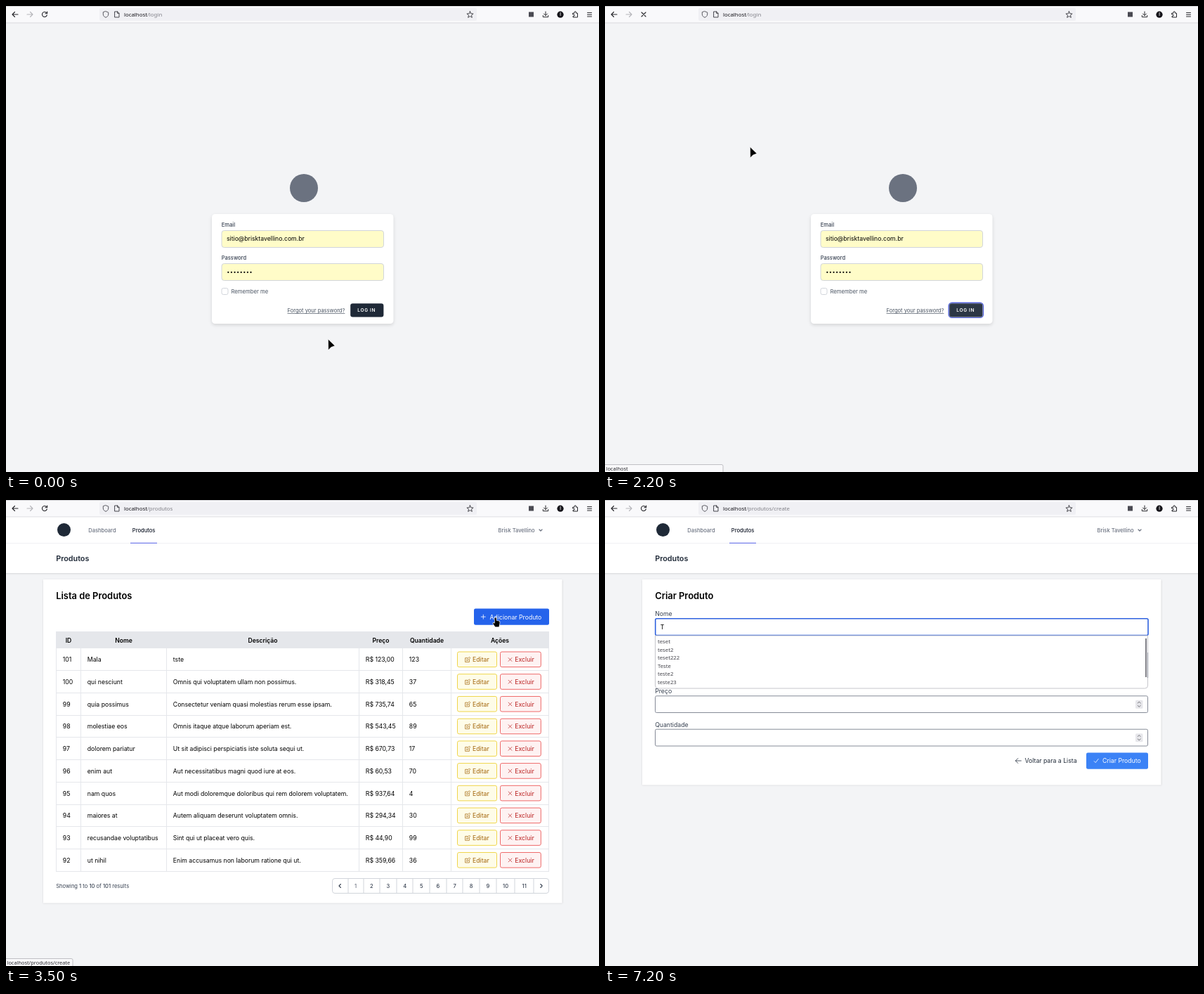
Animation of 844x663 px, one loop 8000 ms. Source, as an HTML page with a canvas:

```html
<!DOCTYPE html>
<html lang="pt-BR">
<head>
<meta charset="utf-8">
<title>Produtos</title>
<style>
html, body { margin: 0; width: 100%; height: 100%; overflow: hidden; background: #f3f4f6; }
canvas { display: block; width: 844px; height: 663px; }
</style>
</head>
<body>
<canvas id="stage" width="844" height="663"></canvas>
<script>
const ctx = document.getElementById('stage').getContext('2d');
const LOOP = 8000;
const UI = 'Inter, sans-serif';
const CHROME = '"Noto Sans", sans-serif';
const BODY = 8.7, SMALL = 7.55;
const GRAY = { line: '#e5e7eb', mid: '#d1d5db', soft: '#6b7280', text: '#374151', dark: '#1f2937' };

// --- drawing helpers ---
function text(str, x, y, { size = BODY, color = '#111', weight = 400, align = 'left', font = UI, spacing = 0 } = {}) {
  ctx.font = `${weight} ${size}px ${font}`;
  ctx.letterSpacing = spacing + 'px';
  ctx.textAlign = align;
  ctx.fillStyle = color;
  ctx.fillText(str, x, y);
  return x + ctx.measureText(str).width;
}

function rect(x, y, w, h, color) {
  ctx.fillStyle = color;
  ctx.fillRect(x, y, w, h);
}

function box(x, y, w, h, r, fill, stroke, width = 1) {
  ctx.beginPath();
  ctx.roundRect(x, y, w, h, r);
  if (fill) { ctx.fillStyle = fill; ctx.fill(); }
  if (stroke) { ctx.strokeStyle = stroke; ctx.lineWidth = width; ctx.stroke(); }
}

function card(x, y, w, h, r, blur, drop) {
  ctx.save();
  ctx.shadowColor = 'rgba(0,0,0,.13)';
  ctx.shadowBlur = blur;
  ctx.shadowOffsetY = drop;
  box(x, y, w, h, r, '#fff');
  ctx.restore();
}

function disc(x, y, r, color) {
  ctx.fillStyle = color;
  ctx.beginPath();
  ctx.arc(x, y, r, 0, 7);
  ctx.fill();
}

// Strokes an SVG path centred on (x, y).
function icon(d, x, y, color = '#26262b', width = 1, fill) {
  const path = new Path2D(d);
  ctx.save();
  ctx.translate(x, y);
  ctx.lineCap = ctx.lineJoin = 'round';
  if (fill) { ctx.fillStyle = fill; ctx.fill(path); }
  ctx.strokeStyle = color;
  ctx.lineWidth = width;
  ctx.stroke(path);
  ctx.restore();
}

const CROSS = 'M-3-3L3 3M3-3L-3 3';
const ARROW_LEFT = 'M4 0H-4M-.5-3.5L-4 0L-.5 3.5';
const ARROW_RIGHT = 'M-4 0H4M.5-3.5L4 0L.5 3.5';

// --- browser frame ---
function reloadIcon(t) {
  const stopped = (t >= 1900 && t < 2600);
  if (stopped) return icon(CROSS, 55, 12, '#26262b', 1.1);
  if (t >= 4100 && t < 4600) return icon('M-3-3L3 3M-3 3L-2 2', 55, 12, '#a5a5ac', .9);
  ctx.save();
  ctx.translate(55, 12);
  if (t >= 1500 && t < 1900) ctx.rotate(Math.min(1, (t - 1400) / 200) * Math.PI);
  icon('M3.3 1A3.5 3.5 0 1 1 2.4-2.5M3.6-4V-1.3H.8', 0, 0, '#26262b', 1.1);
  ctx.restore();
}

function browser(t, path) {
  rect(0, 0, 844, 24, '#f9f9fb');
  rect(0, 0, 844, 1, '#d2d2d6');
  rect(0, 23.5, 844, 1, '#d9d9dd');
  box(133, 3, 537, 18, 2, '#f0f0f4');
  icon(ARROW_LEFT, 13, 12, '#26262b', 1.1);
  icon(ARROW_RIGHT, 34, 12, '#b5b5ba', 1.1);
  reloadIcon(t);
  icon('M0-4.3L3.7-2.9V0C3.7 2.2 1.8 3.6 0 4.3C-1.8 3.6-3.7 2.2-3.7 0V-2.9Z', 142, 12, '#4a4a52', .9);
  icon('M-3-4H.6L3-1.6V4H-3ZM.6-4V-1.6H3', 158, 12, '#35353b', .9);
  const url = { size: 7.8, font: CHROME };
  const x = text('localhost', 168, 15, { ...url, color: '#15141a' });
  text(path, x, 15, { ...url, color: '#808088' });

  let star = '';
  for (let i = 0; i < 10; i++) {
    const r = i % 2 ? 2.1 : 4.8, a = i * Math.PI / 5 - Math.PI / 2;
    star += (i ? 'L' : 'M') + r * Math.cos(a) + ' ' + r * Math.sin(a);
  }
  icon(star + 'Z', 660.5, 12.5, '#35353b', .9);
  rect(744, 8.5, 7, 7, '#4a4a52');
  icon('M0-4V1.5M-2.5-1L0 1.5L2.5-1M-3.7 1.5V3.7H3.7V1.5', 768, 12);
  disc(789, 12.2, 4.6, '#15141a');
  text('I', 789, 14.4, { size: 6, weight: 600, color: '#fff', align: 'center' });
  icon('M-3.5-1.8H-1.5V-3A1.2 1.2 0 0 1 .9-3V-1.8H3V4H-3.5V2.4H-2.5A1.2 1.2 0 0 0-2.5 0H-3.5Z', 810.5, 12);
  icon('M-3-2.7H3M-3 0H3M-3 2.7H3', 830.5, 12.3);
}

function status(str, width) {
  box(-2, 652.5, width + 2, 14, 2, '#f9f9fb', '#bfbfc4');
  text(str, 1.5, 660.7, { size: 7.37, font: CHROME, color: '#2b2b30' });
}

// --- login page ---
function loginPage(t) {
  browser(t, '/login');
  disc(424, 259, 20, GRAY.soft);
  card(293, 296, 258.5, 156, 4.6, 5, 2);

  const label = { size: SMALL, weight: 500, color: GRAY.text };
  text('Email', 306.7, 314, label);
  text('Password', 306.7, 361.2, label);
  for (const y of [319.5, 366.5]) box(307, y, 230.5, 24, 3.5, '#fffcc8', GRAY.mid);
  text('sitio@brisktavellino.com.br', 314, 334.2, { color: '#000' });
  for (let i = 0; i < 8; i++) disc(316.3 + i * 4.6, 378.8, 1.15, '#000');

  box(307, 401.5, 9, 9, 2.3, '#fff', GRAY.mid);
  text('Remember me', 320.5, 408.8, { size: 7.7, color: '#4b5563' });
  const end = text('Forgot your password?', 400.5, 436, { size: SMALL, color: '#4b5563' });
  rect(400.5, 437.2, end - 400.5, .7, '#4b5563');

  if (t >= 1400) box(489.2, 422.2, 49.2, 21.2, 4.5, '#fff', '#4f5fd8', 1.4);
  const fill = t >= 600 ? '#2c3745' : GRAY.dark;
  box(490.2, 423.2, 47.2, 19.2, 3.2, fill);
  text('LOG IN', 500.3, 435.3, { size: 6.5, weight: 600, color: '#fff', spacing: .7 });

  if (t >= 1500) status('localhost', 168);
}

// --- shop pages ---
function shopFrame(title, cardBottom) {
  card(-4, 62, 852, 42, 0, 2, 1);
  rect(0, 24.5, 844, 37, '#fff');
  rect(0, 61, 844, 1, '#f0f1f4');
  disc(82.5, 42.5, 9.5, GRAY.dark);
  const link = { size: SMALL, weight: 500, color: GRAY.soft };
  text('Dashboard', 117.2, 46, link);
  text('Produtos', 179.8, 46, { ...link, color: '#111827' });
  rect(177, 60.7, 38, 1.2, '#7079ea');
  text('Brisk Tavellino', 700.5, 45.8, link);
  icon('M-2-1L0 1L2-1', 761, 43, GRAY.soft, 1.2);
  text('Produtos', 71.2, 87.2, { size: 10.8, weight: 600, color: GRAY.dark });
  card(53, 113, 738.5, cardBottom - 113, 0, 2.5, .6);
  text(title, 71.2, 141.3, { size: 12.9, weight: 600, color: '#000' });
}

const COLUMNS = [71.5, 106.5, 228.5, 502.5, 564.5, 633.5, 772.5];
const HEADINGS = ['ID', 'Nome', 'Descrição', 'Preço', 'Quantidade', 'Ações'];
const PRODUCTS = [
  'Mala|tste|123,00|123',
  'qui nesciunt|Omnis qui voluptatem ullam non possimus.|318,45|37',
  'quia possimus|Consectetur veniam quasi molestias rerum esse ipsam.|735,74|65',
  'molestiae eos|Omnis itaque atque laborum aperiam est.|543,45|89',
  'dolorem pariatur|Ut sit adipisci perspiciatis iste soluta sequi ut.|670,73|17',
  'enim aut|Aut necessitatibus magni quod iure at eos.|60,53|70',
  'nam quos|Aut modi doloremque doloribus qui rem dolorem voluptatem.|937,64|4',
  'maiores at|Autem aliquam deserunt voluptatem omnis.|294,34|30',
  'recusandae voluptatibus|Sint qui ut placeat vero quis.|44,90|99',
  'ut nihil|Enim accusamus non laborum ratione qui ut.|359,66|36'
].map(line => line.split('|'));

function productRow([name, about, price, count], i) {
  const y = 227 + i * 31.72;
  const cells = [101 - i, name, about, 'R$ ' + price, count];
  cells.forEach((cell, c) => text(String(cell), COLUMNS[c] + 9.3, y + 3.2, { color: '#000' }));
  box(642.5, y - 11, 56, 21.6, 2.3, '#fefce8', '#efd54a');
  icon('M0-2.6H-3.2V3.2H2.6V0M-1 1L-.6-.8L2.6-4L4-2.6L.8 .6Z', 656.8, y + .3, '#a16207', .7);
  text('Editar', 664, y + 3.2, { color: '#a16207' });
  box(703.5, y - 11, 57.8, 21.6, 2.3, '#fef2f2', '#ee6868');
  icon('M-2.4-2.4L2.4 2.4M2.4-2.4L-2.4 2.4', 717.5, y, '#b91c1c', .7);
  text('Excluir', 724.3, y + 3.2, { color: '#b91c1c' });
}

function pagination() {
  const plain = { size: SMALL, color: GRAY.text }, strong = { ...plain, weight: 500 };
  let x = 71.2;
  'Showing |1| to |10| of |101| results'.split('|').forEach((part, i) => {
    x = text(part, x, 551.6, i % 2 ? strong : plain);
  });
  box(464.5, 538.5, 308, 21, 3.5, '#fff', GRAY.mid);
  const edges = [486.5];
  for (let n = 1; n <= 11; n++) {
    const left = edges[n - 1], width = n === 1 ? 22 : n < 10 ? 23.65 : 26.7;
    edges.push(left + width);
    text(String(n), left + width / 2, 551.6, { ...strong, align: 'center', color: n === 1 ? GRAY.soft : GRAY.text });
  }
  for (const edge of edges) rect(Math.round(edge) - .5, 538.5, 1, 21, GRAY.mid);
  icon('M1.2-2.5L-1.2 0L1.2 2.5', 475.2, 549, GRAY.text, 1.1);
  icon('M-1.2-2.5L1.2 0L-1.2 2.5', 762, 549, GRAY.text, 1.1);
}

function listPage(t) {
  browser(t, '/produtos');
  shopFrame('Lista de Produtos', 573.5);
  box(666, 154.5, 107, 23.3, 2.3, t >= 3200 ? '#2563eb' : t >= 3100 ? '#3073f1' : '#3b82f6');
  icon('M-3 0H3M0-3V3', 679.3, 166.2, '#fff', .8);
  text('Adicionar Produto', 688.6, 169.6, { color: '#fff' });

  rect(71, 187, 702, 24, GRAY.line);
  HEADINGS.forEach((name, c) => text(name, (COLUMNS[c] + COLUMNS[c + 1]) / 2, 202.6,
    { size: 8.6, weight: 600, color: '#000', align: 'center' }));
  for (let i = 1; i <= 10; i++) rect(71, Math.round(210.5 + i * 31.72), 702, 1, GRAY.line);
  for (const x of COLUMNS) rect(x - .5, 211, 1, 317.5, GRAY.line);
  PRODUCTS.forEach(productRow);
  pagination();

  if (t < 2600) status('Transferring data from localhost…', 168);
  if (t >= 3500) status('localhost/produtos/create', 95);
}

function field(label, y, h, focused) {
  text(label, 71.2, y - 3.4, { color: GRAY.text });
  if (focused) box(71.7, y + .2, 701.3, h - .2, 2, '#fff', '#2f62df', 1.6);
  else box(71.5, y, 701, h, 2, '#fff', '#858b97');
}

function spinner(y) {
  box(755, y - 6, 10.5, 12, 1.5, '#e7e7eb');
  icon('M-2-1.7L0-3.6L2-1.7M-2 1.7L0 3.6L2 1.7', 760.2, y, '#55555c', .8);
}

function suggestions() {
  box(71.5, 193, 701, 75, [0, 0, 4, 4], '#fff', '#c6c6cb');
  ['teset', 'teset2', 'teset222', 'Teste', 'teste2', 'teste23'].forEach((word, i) =>
    text(word, 75, 204.2 + i * 11.55, { size: 7.7, font: CHROME, color: '#46464d' }));
  rect(769, 197, 2, 55, '#7f7f86');
  rect(772, 217, 1, 36, '#858b97');
}

function createPage(t) {
  browser(t, '/produtos/create');
  shopFrame('Criar Produto', 405.5);
  field('Nome', 168.5, 24, t >= 5400);
  field('Descrição', 216, 37.5);
  field('Preço', 278.8, 23.7);
  field('Quantidade', 326.2, 23.8);
  icon('M-2.3 2.3L2.3-2.3M0 2.3L2.3 0', 769.4, 250.2, '#77777e', .8);
  spinner(290.7);
  spinner(338.2);
  icon(ARROW_LEFT, 588.3, 371, '#26313f', .8);
  text('Voltar para a Lista', 597.5, 374.2, { color: GRAY.dark });
  box(685, 359.5, 88, 23.2, 2.3, '#3b82f6');
  icon('M-3 .6L-1 2.6L3-2.6', 699.2, 371, '#fff', .8);
  text('Criar Produto', 708, 374.2, { color: '#fff' });

  if (t >= 6800) {
    text('T', 78.8, 184.2, { color: '#000' });
    suggestions();
  }
  if (t >= 5400 && t < 6000) rect(79, 175, 1, 12, '#000');
  if (t >= 6800 && t < 7200) rect(84, 175, 1, 12, '#000');
}

// --- pointer ---
const TRACK = [
  [100, 459, 475], [600, 513.5, 437.5], [1700, 513.5, 437.5], [2300, 182.5, 182.5],
  [2900, 637, 170], [3000, 637, 170], [3100, 695.8, 167.3], [4500, 695.8, 167.3], [4700, 284.3, 177]
];
const SHAPES = {
  arrow: 'M0 0L8.5 8.3L3.8 10L.2 13.6Z',
  hand: 'M0 .8Q1-.6 2 .8V4.5L6 5.3Q7 5.7 6.6 8.5L5.6 13H.6L-2.3 9Q-2.8 7.6-1.6 7.6L0 8.4Z',
  beam: 'M-2-5.5H2M0-5.5V5.5M-2 5.5H2'
};

function pointerAt(t) {
  const next = TRACK.findIndex(key => key[0] > t);
  if (next === 0) return TRACK[0].slice(1);
  if (next < 0) return TRACK[TRACK.length - 1].slice(1);
  const [t0, x0, y0] = TRACK[next - 1], [t1, x1, y1] = TRACK[next];
  const p = (t - t0) / (t1 - t0), e = p * p * (3 - 2 * p);
  return [x0 + (x1 - x0) * e, y0 + (y1 - y0) * e];
}

function pointer(t) {
  if (t >= 6800) return;
  const [x, y] = pointerAt(t);
  if (t >= 4700) {
    icon(SHAPES.beam, x, y, '#fff', 2.6);
    icon(SHAPES.beam, x, y, '#000', 1.2);
    return;
  }
  const hand = (t >= 600 && t <= 1700) || (t >= 3500 && t < 4100);
  const shape = hand ? SHAPES.hand : SHAPES.arrow;
  icon(shape, x, y, '#fff', 1.6);
  icon(shape, x, y, '#000', .3, '#000');
}

function draw(now) {
  const t = Math.floor(now % LOOP / 100) * 100;
  rect(0, 0, 844, 663, '#f3f4f6');
  (t < 2300 ? loginPage : t < 4100 ? listPage : createPage)(t);
  pointer(t);
}

const start = performance.now();
function tick() {
  draw(performance.now() - start);
  requestAnimationFrame(tick);
}
tick();
</script>
</body>
</html>
```
